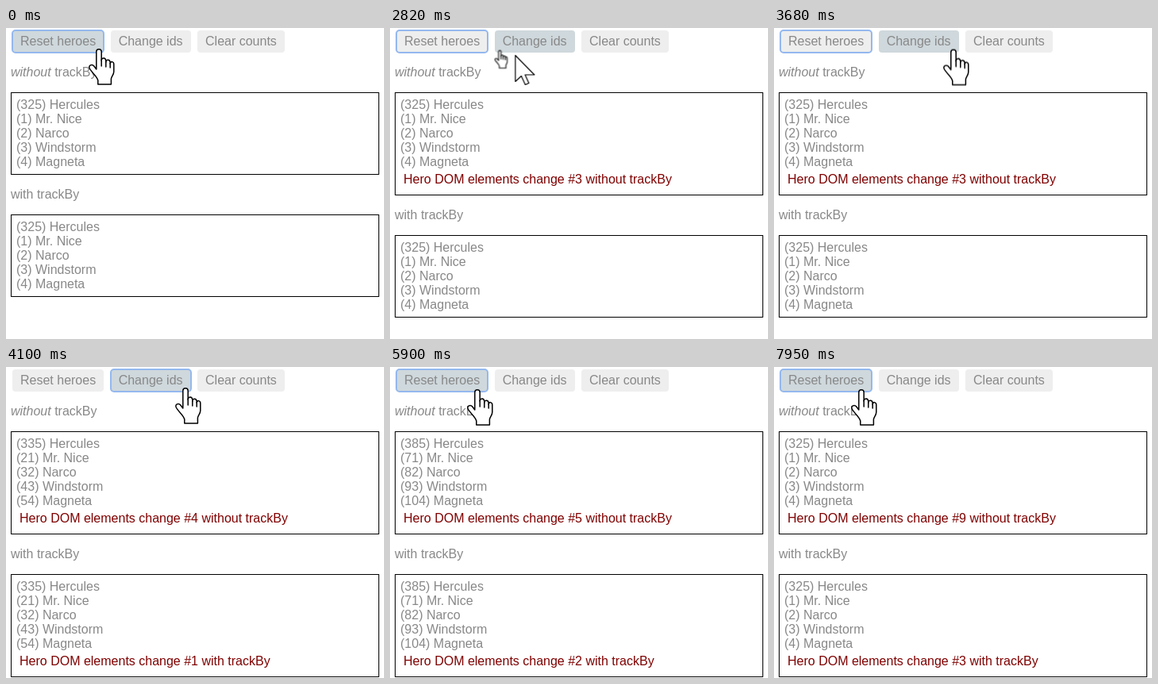
An HTML page for the animation above (8 s loop, 476x392 px).

```html
<!DOCTYPE html>
<html lang="en">
<head>
<meta charset="utf-8">
<title>trackBy demo</title>
<style>
  html, body { margin: 0; width: 476px; height: 392px; overflow: hidden; background: #fff; }
  body { position: relative; color: #888; font: 16px/18px Arial, "Liberation Sans", sans-serif; }

  main { position: absolute; left: 6px; top: 3px; width: 464px; }
  nav { height: 28px; white-space: nowrap; }
  button {
    margin: 0 2px; padding: 5px 10px; border: 0; border-radius: 4px;
    background: #eee; color: #888; font: inherit; vertical-align: top;
  }
  p { margin: 16px 0; }
  .box { box-sizing: border-box; padding: 6px; border: 1px solid #000; }
  .note { margin: 4px; color: maroon; white-space: nowrap; }
  .note[hidden] { display: none; }

  /* Hover and focus of the two used buttons */
  #reset { animation: reset-hover 8s step-end infinite, reset-focus 8s step-end infinite; }
  #change { animation: change-hover 8s step-end infinite, change-focus 8s step-end infinite; }
  button { outline: 2px solid transparent; outline-offset: -1px; }
  @keyframes reset-hover {
    0%, 69% { background: #cfd8dc; }
    34.3% { background: #eee; }
    100% { background: #cfd8dc; }
  }
  @keyframes change-hover {
    0%, 36.8%, 63.2%, 100% { background: #eee; }
    34.8%, 45% { background: #cfd8dc; }
  }
  @keyframes reset-focus {
    0%, 73.75%, 100% { outline-color: #94b8ee; }
    46.75% { outline-color: transparent; }
  }
  @keyframes change-focus {
    0%, 73.75%, 100% { outline-color: transparent; }
    46.75% { outline-color: #94b8ee; }
  }

  /* Large pointer and the small one trailing it */
  #stage { position: absolute; left: 0; top: 0; pointer-events: none; }
  .shape { fill: #fff; stroke: #000; stroke-linejoin: round; stroke-linecap: round; }
  #big { animation: lead 8s linear infinite; }
  #small { animation: trail 8s linear infinite, trail-show 8s step-end infinite; }
  #big .hand { animation: big-hand 8s step-end infinite; }
  #big .arrow { animation: big-arrow 8s step-end infinite; }
  #small .hand { animation: small-hand 8s step-end infinite; }
  #small .arrow { animation: small-arrow 8s step-end infinite; }

  @keyframes lead {
    0%, 32.25% { transform: translate(117px, 26px); }
    33.5% { transform: translate(131px, 32px); }
    35.25% { transform: translate(157px, 34px); animation-timing-function: ease-out; }
    40.125% { transform: translate(234px, 34px); }
    40.6% { transform: translate(235px, 34px); }
    41.25%, 43.25% { transform: translate(231px, 34px); }
    45.5% { transform: translate(226px, 27px); }
    46.75%, 62.375% { transform: translate(226px, 26px); }
    63.5% { transform: translate(185px, 38px); }
    64.5% { transform: translate(150px, 43px); }
    65.5% { transform: translate(132px, 43px); }
    67.5% { transform: translate(117px, 37px); }
    70%, 100% { transform: translate(110px, 28px); }
  }
  @keyframes trail {
    0%, 32.25% { transform: translate(117px, 26px); }
    35.25% { transform: translate(138px, 28px); }
    37% { transform: translate(175px, 32px); }
    40.125%, 62.375% { transform: translate(234px, 34px); }
    62.5% { transform: translate(226px, 27px); }
    64.5% { transform: translate(165px, 41px); }
    65.5% { transform: translate(140px, 42px); }
    67% { transform: translate(121px, 39px); }
    70%, 100% { transform: translate(110px, 28px); }
  }
  @keyframes trail-show {
    0%, 39.5%, 67%, 100% { opacity: 0; }
    33.25%, 63% { opacity: 1; }
  }
  @keyframes big-hand {
    0%, 44.8%, 69%, 100% { opacity: 1; }
    33.2%, 62.8% { opacity: 0; }
  }
  @keyframes big-arrow {
    0%, 44.8%, 69%, 100% { opacity: 0; }
    33.2%, 62.8% { opacity: 1; }
  }
  @keyframes small-hand { 0%, 100% { opacity: 1; } 36.8% { opacity: 0; } }
  @keyframes small-arrow { 0%, 100% { opacity: 0; } 36.8% { opacity: 1; } }
</style>
</head>
<body>
<main>
  <nav>
    <button id="reset">Reset heroes</button>
    <button id="change">Change ids</button>
    <button>Clear counts</button>
  </nav>
  <p><i>without</i> trackBy</p>
  <div class="box"><div class="list"></div><div class="note" id="without" hidden></div></div>
  <p>with trackBy</p>
  <div class="box"><div class="list"></div><div class="note" id="with" hidden></div></div>
</main>

<svg id="stage" width="476" height="392" viewBox="0 0 476 392">
  <defs>
    <g id="hand" transform="translate(-14.2 -1)">
      <path d="M11 27V5a3.2 3.2 0 0 1 6.4 0V16c0-4 5.6-4 5.6 .5V18c0-4 5.4-3.6 5.4 .6V20c.4-3.6 4.6-3 4.6 .8V30c0 4-3 6-3.4 9V46H13V41c-1-5-8-10-10.5-15c-2-4 3-6 5.5-3z"/>
      <path d="M17.4 15V23M23 17.5V24M28.4 19.5V25" fill="none"/>
    </g>
    <path id="arrow" d="M.5 .5V33.5L8 26.5L13 37.5L17.5 35.5L12.8 25H24.5Z"/>
  </defs>
  <g id="small" class="shape" stroke-width="2.2">
    <use class="hand" href="#hand" transform="scale(.5)"/>
    <use class="arrow" href="#arrow" transform="scale(.5)"/>
  </g>
  <g id="big" class="shape" stroke-width="1.5">
    <use class="hand" href="#hand"/>
    <use class="arrow" href="#arrow" stroke-width="1.2"/>
  </g>
</svg>

<script>
  const LOOP = 8000;
  const heroes = [[325, 'Hercules'], [1, 'Mr. Nice'], [2, 'Narco'], [3, 'Windstorm'], [4, 'Magneta']];
  const changes = {
    without: [1090, 1850, 2580, 4100, 4790, 6090, 6790, 7350, 7950],
    with: [4100, 4790, 6090]
  };
  const lists = [...document.querySelectorAll('.list')].map(list =>
    heroes.map(() => list.appendChild(document.createElement('div'))));

  function setText(el, text) {
    if (el.textContent !== text) el.textContent = text;
  }

  // Each id change adds ten times a running increment
  function idShift(t, i) {
    if (t < 4000 || t >= 5960) return 0;
    return 10 * (i + (t < 4530 ? 1 : 6));
  }

  function render(t) {
    heroes.forEach(([id, name], i) => {
      const line = `(${id + idShift(t, i)}) ${name}`;
      lists.forEach(rows => setText(rows[i], line));
    });
    for (const kind in changes) {
      const note = document.getElementById(kind);
      const count = changes[kind].filter(at => at <= t).length;
      note.hidden = count === 0;
      setText(note, `Hero DOM elements change #${count} ${kind} trackBy`);
    }
  }

  let start;
  function tick(now) {
    start ??= now;
    render((now - start) % LOOP);
    requestAnimationFrame(tick);
  }
  render(0);
  requestAnimationFrame(tick);
</script>
</body>
</html>
```
